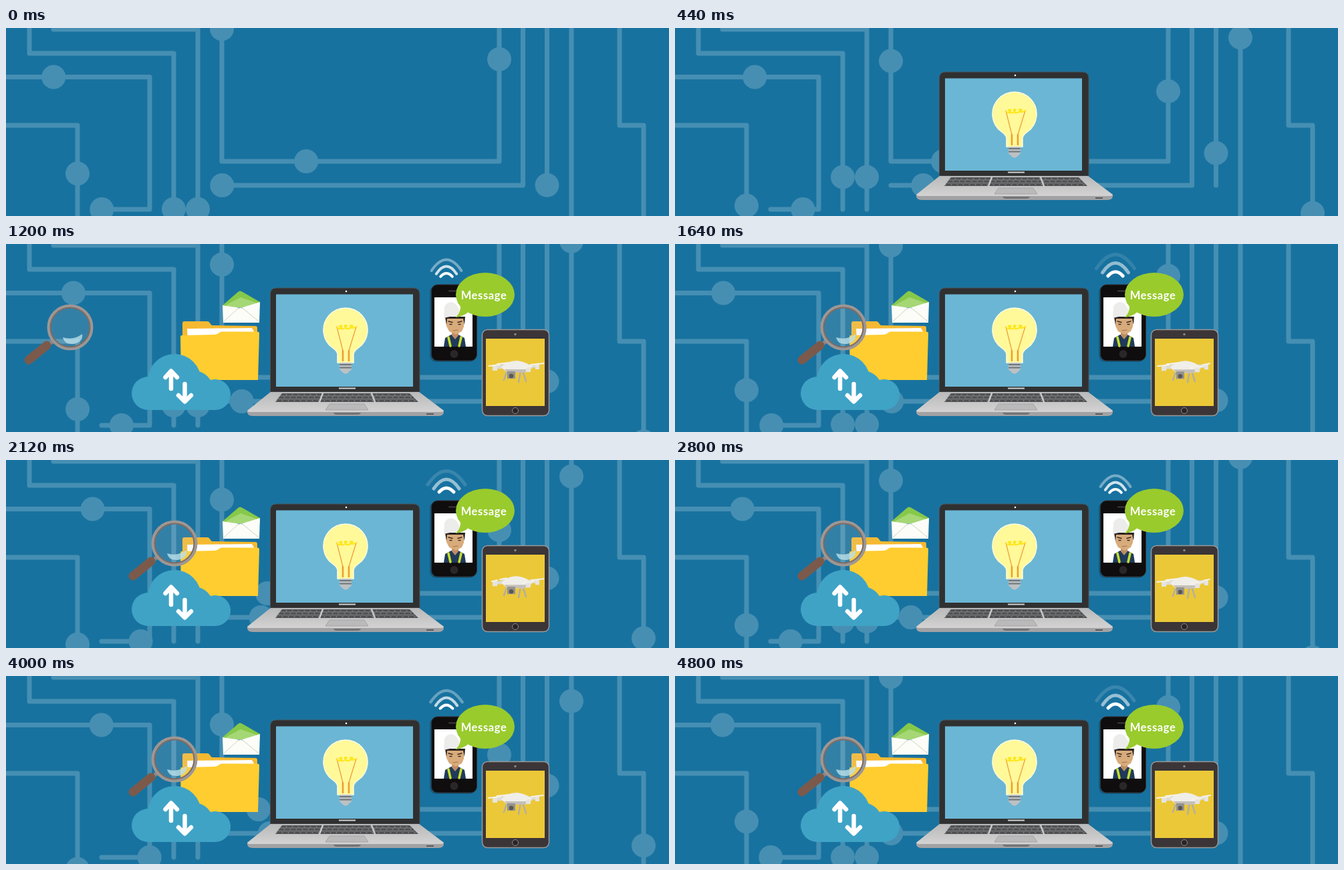
An HTML page for the animation above (4.84 s loop, 992x282 px).

```html
<!DOCTYPE html>
<html lang="en">
<head>
<meta charset="utf-8">
<title>Connected devices</title>
<style>
  html, body { margin: 0; width: 100%; height: 100%; overflow: hidden; background: #18729f; }
  svg { display: block; width: 992px; height: 282px; }
  .line { fill: none; stroke-linecap: round; stroke-linejoin: round; }
</style>
</head>
<body>
<svg viewBox="0 0 992 282">
  <defs>
    <linearGradient id="deck" x2="0" y2="1"><stop stop-color="#b9b9ba"/><stop offset="1" stop-color="#d3d3d3"/></linearGradient>
  </defs>
  <rect width="992" height="282" fill="#18729f"/>
  <path class="line" stroke="#468fb3" stroke-width="7" d="M35 -5V38H251V272M71 2H287V272M287 2V-5M-5 73.500H215V272H143M-5 146H107V290
    M323 -5V200H738V-5M323 236H773.500V-5M809.500 -5V236M846 -5V290M918 -5V146H954V290"/>
  <g id="dots" fill="#468fb3"></g>

  <g id="envelope">
    <path d="M324 92L347 72Q350 69 354 72L380 87V94H324Z" fill="#86c94a"/>
    <path d="M330 91L351 80L374 88V95H330Z" fill="#a5d775"/>
    <path d="M324 92L351 96L380 87L379 118H325Z" fill="#fcfdf8"/>
    <path class="line" stroke="#c9d4bd" d="M326 116L347 97Q351 94 355 97L378 116"/>
  </g>

  <g id="folder">
    <path d="M264 119Q264 116 267 116H301Q304 116 306 120L308 122L373 123Q376 123 376 126L375 198L264 190Z" fill="#f5b931"/>
    <path d="M271 127L368 126L372 133V145H272Z" fill="#fff"/>
    <path d="M261 139Q261 137 263 137L312 136Q316 136 319 133L322 131.500H376Q379 131.500 379 134L377 204H264Q262 204 262 202Z" fill="#ffcd30"/>
  </g>

  <g id="cloud">
    <g fill="#3fa3c6">
      <circle cx="213" cy="224" r="25"/><circle cx="252" cy="205" r="40"/><circle cx="281" cy="219" r="29"/>
      <circle cx="313" cy="226" r="23"/><path d="M213 215H313V249H213Z"/>
    </g>
    <path class="line" stroke="#fff" stroke-width="6.500" d="M247 217V191M238.500 200L247 190.500L256 200M267.500 210V236M258 227L267.500 236.500L277 227"/>
  </g>

  <g id="laptop">
    <path d="M395.500 222V75Q395.500 66 405 66H609Q619 66 619 75V222Z" fill="#303031" stroke="#4b5358"/>
    <path d="M404 75.500H609V214H404Z" fill="#6bb6d4"/>
    <circle cx="509" cy="71" r="1.300" fill="#fff"/>
    <path d="M498 215.500H523V217.500H498Z" fill="#d2d2d2"/>
    <path d="M396 222H618L655 250V252Q655 258 646 258H370Q361 258 361 252V250Z" fill="#a2a2a4"/>
    <path d="M396 222H618L655 250Q654 252 650 252H366Q362 252 361 250Z" fill="url(#deck)"/>
    <path d="M413 224H604L617 237H403Z" fill="#505153"/>
    <path class="line" stroke="#858587" stroke-width="1" d="M410 228H607M406 232.500H611"/>
    <path class="line" stroke="#a0a0a1" stroke-width="1.200" stroke-dasharray="1 8" d="M410 226H608M407 230H611M404 235H615"/>
    <path class="line" stroke="#c8c8c8" stroke-width="2.500" d="M474 224L469 237M547 224L552 237"/>
    <path d="M484 240H536L542 249H478Z" fill="#bababb" stroke="#a5a5a6"/>
    <path d="M490 253H531Q530 256 526 256H495Q491 256 490 253Z" fill="#727274"/>
    <path d="M629 254H640V256H629Z" fill="#59595b"/>

    <path d="M496 178V166Q496 161 489 156A33 33 0 1 1 527 156Q520 161 520 166V178Z" fill="#fff99a" stroke="#fffde0" stroke-width="1.500"/>
    <path class="line" stroke="#eda63f" stroke-width="1.400" d="M495 124L504 160M524 124L513 160"/>
    <path class="line" stroke="#ee9d36" stroke-width="2.600" d="M504 160V175M513 160V175"/>
    <path class="line" stroke="#ffe617" stroke-width="2" d="M495 125Q500 129 502 125T499 123Q501 130 507 126T507 122Q507 130 515 126T515 122Q516 129 524 124"/>
    <path d="M499 178H517V188L512 193Q508 196 504 193L499 188Z" fill="#bcc1c3"/>
    <path class="line" stroke="#6c7478" stroke-width="2" d="M500 181H516M500 185.500H516"/>
  </g>

  <g id="waves" class="line" stroke="#fff" stroke-width="5">
    <path d="M-11 -4Q0 -16 11 -4"/>
    <path id="middleWave" d="M-19 -9Q0 -37 19 -9"/>
    <path id="outerWave" d="M-28 -15Q0 -56 28 -15"/>
  </g>

  <g id="phone">
    <rect x="634" y="63" width="69" height="114" rx="9" fill="#125a80"/>
    <rect x="636.500" y="61" width="68" height="114" rx="9" fill="#0f0d0e" stroke="#343033"/>
    <path d="M641 80H698V154H641Z" fill="#fff"/>
    <path class="line" stroke="#3f3b3c" stroke-width="2" d="M663 70.500H677"/>
    <circle cx="670.500" cy="165" r="6" fill="#2b2728"/>
    <path d="M655 154L657 141L666 136H677L686 141L688 154Z" fill="#203a5c"/>
    <path class="line" stroke="#c7df2d" stroke-width="3.500" d="M662 140L665 153M681 140L678 153"/>
    <path d="M667 131H677V137L672 143L667 137Z" fill="#c08c60"/>
    <path d="M657 109H686L685 124L682 131L673 136L663 131L659 123Z" fill="#d8ab7b"/>
    <path d="M657 109H687L686 121L684 112H660L659 121Z" fill="#292322"/>
    <path d="M655 111L656 94Q660 87 666 87Q674 88 676 95L684 108Q670 107 655 111Z" fill="#ececeb"/>
    <path class="line" stroke="#3a2823" stroke-width="1.300" d="M662 116L668 117.500M676 117.500L682 116M664 120.500H667M677 120.500H680"/>
    <path class="line" stroke="#a5704e" d="M669 130L676 129"/>
  </g>

  <g id="bubble">
    <path d="M680 92Q681 102 673 110Q684 109 693 101Z" fill="#99cb2d"/>
    <ellipse cx="717" cy="76" rx="44" ry="33" fill="#99cb2d"/>
    <text x="715" y="82.500" text-anchor="middle" font-family="Lato, sans-serif" font-weight="700" font-size="16.500" letter-spacing=".6" fill="#fff">Message</text>
  </g>

  <g id="tablet">
    <rect x="712.500" y="128.500" width="100" height="129" rx="8" fill="#3b3537" stroke="#9a9899" stroke-width="1.500"/>
    <path d="M718 142H806V243H718Z" fill="#ebc838"/>
    <circle cx="762" cy="135.500" r="1.700" fill="#89898b"/>
    <circle cx="762" cy="250" r="4.500" fill="#292527" stroke="#8f8c8d"/>
    <g id="drone">
      <path class="line" stroke="#b3aea4" stroke-width="2.500" d="M750 190L745 204M773 190L778 206M770 190L767 207"/>
      <path class="line" stroke="#dedcd6" stroke-width="5" d="M731 185L752 184L783 188M744 181L780 183L795 183"/>
      <path d="M741 185Q749 175 765 175Q781 177 787 186L776 193H750Z" fill="#f0eee9"/>
      <path d="M746 188L783 188L776 193H750Z" fill="#c4c0b8"/>
      <path d="M728 182H735V190H728ZM778 184H785V192H778ZM792 180H798V188H792Z" fill="#e6e4df"/>
      <path d="M750 191H762V202H750Z" fill="#96938e"/><circle cx="756" cy="198" r="3.300" fill="#5b5753"/>
      <g id="props" class="line" stroke="#f5f3e8" stroke-width="2"></g>
    </g>
  </g>

  <g id="magnifier">
    <path class="line" stroke="#8d8683" stroke-width="6" d="M-25 20L-34 27"/>
    <path class="line" stroke="#7c5a4b" stroke-width="13" d="M-35 27L-62 49"/>
    <circle r="31" fill="#d5d5d5" fill-opacity=".14" stroke="#7e6a62" stroke-width="5"/>
    <circle r="32.500" fill="none" stroke="#9c9795" stroke-width="4"/>
    <path d="M-11 15Q5 20 18 10Q20 22 5 25Q-9 26 -11 15Z" fill="#b9dfe8" opacity=".8"/>
  </g>
</svg>
<script>
const LOOP = 4840, STEP = 40, TRAVEL = 72;
const get = id => document.getElementById(id);
const clamp = x => Math.max(0, Math.min(1, x));
const easeInOut = x => x < .5 ? 2 * x * x : 1 - 2 * (1 - x) ** 2;
const easeOut = x => 1 - (1 - x) ** 3;
const progress = (t, start, end) => clamp((t - start) / (end - start));

function add(parent, tag) {
  return parent.appendChild(document.createElementNS("http://www.w3.org/2000/svg", tag));
}

// x, y, direction x, direction y
const dots = [
  [71, 73.5, 1, 0], [323, 1, 0, 1], [738, 46.5, 0, 1], [449.5, 200, -1, 0],
  [323, 236, 1, 0], [809.5, 236, 0, -1], [107, 218, 0, 1], [143, 272, 1, 0],
  [251, 272, 0, -1], [287, 272, 0, -1], [846, -34, 0, 1], [954, 326, 0, -1]
].map(([x, y, dx, dy]) => {
  const node = add(get("dots"), "circle");
  node.setAttribute("r", 18);
  return { node, x, y, dx, dy };
});
const props = [[731, 182], [781, 184], [795, 180], [744, 179]].map(([x, y]) => ({ node: add(get("props"), "path"), x, y }));

// id, start, centre x, centre y
const pops = [["laptop", 80, 508, 165], ["folder", 520, 320, 160], ["envelope", 680, 352, 95],
  ["cloud", 600, 262, 208], ["bubble", 860, 680, 100]];
const slides = [["phone", 560], ["tablet", 640]];

function place(id, transform, shown = true) {
  get(id).setAttribute("transform", transform);
  get(id).style.display = shown ? "" : "none";
}

function draw(t) {
  const phase = (t + 36) % 1600 / 800;
  const offset = TRAVEL * easeInOut(phase < 1 ? phase : 2 - phase);
  for (const { node, x, y, dx, dy } of dots) {
    node.setAttribute("cx", x + dx * offset);
    node.setAttribute("cy", y + dy * offset);
  }
  for (const [id, start, x, y] of pops) {
    const s = easeOut(progress(t, start, start + 320));
    place(id, `translate(${x} ${y}) scale(${s}) translate(${-x} ${-y})`, s > 0);
  }
  for (const [id, start] of slides) {
    const p = progress(t, start, start + 440);
    place(id, `translate(${(1 - easeOut(p)) * 360} 0)`, p > 0);
  }
  // The waves fade as they spread.
  const spread = .924 + .146 * Math.cos((t - 260) / 800 * Math.PI);
  place("waves", `translate(659 52) scale(${spread})`, t >= 960);
  get("middleWave").style.opacity = 1.75 - 1.2 * spread;
  get("outerWave").style.opacity = 1.44 - 1.3 * spread;
  place("magnifier", `translate(${-60 + 312 * easeInOut(progress(t, 800, 1600))} 125)`, t >= 800);
  place("drone", `translate(0 ${Math.sin(t / 400 * Math.PI)})`);
  props.forEach(({ node, x, y }, i) => {
    const reach = 4 + 6 * Math.abs(Math.cos(t / 90 + i));
    node.setAttribute("d", `M${x - reach} ${y + 1}L${x + reach} ${y - 1}`);
  });
}

function tick() {
  draw(Math.floor(performance.now() % LOOP / STEP) * STEP);
  requestAnimationFrame(tick);
}
tick();
</script>
</body>
</html>
```
